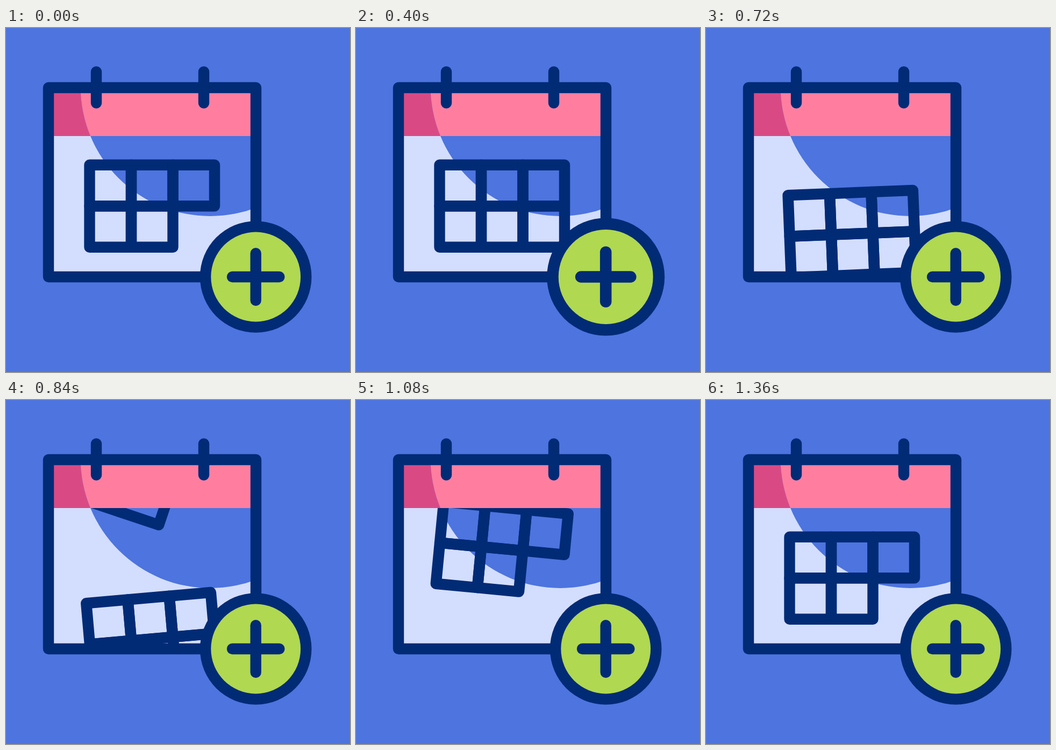
Write an HTML page with a canvas that moves like this. It is 640 by 640 pixels and loops after 1.48 s.

```html
<!DOCTYPE html>
<html lang="en">
<head>
<meta charset="utf-8">
<title>Add calendar day</title>
<style>
html, body { margin: 0; width: 100%; height: 100%; overflow: hidden; background: #4d74df; }
canvas { display: block; width: 640px; height: 640px; }
</style>
</head>
<body>
<canvas id="stage" width="640" height="640"></canvas>
<script>
const ctx = document.getElementById('stage').getContext('2d');
const LOOP = 1480, STEP = 40, LAST = 1360;
const BLUE = '#4d74df', NAVY = '#022b76', PALE = '#d3ddfd';
const PINK = '#ff7ea0', ROSE = '#d94a85', GREEN = '#b0d850';
const CELL_W = 77.5, CELL_H = 76.5, TRAVEL = 248;

// Eased progress from 0 to 1 between two times
function ease(t, start, end) {
  const u = Math.min(1, Math.max(0, (t - start) / (end - start)));
  return u * u * (3 - 2 * u);
}

function rect(color, x, y, w, h) {
  ctx.fillStyle = color;
  ctx.fillRect(x, y, w, h);
}

function disc(color, x, y, r) {
  ctx.fillStyle = color;
  ctx.beginPath();
  ctx.arc(x, y, r, 0, Math.PI * 2);
  ctx.fill();
}

function line(x1, y1, x2, y2) {
  ctx.beginPath();
  ctx.moveTo(x1, y1);
  ctx.lineTo(x2, y2);
  ctx.stroke();
}

function clipTo(x, y, w, h) {
  ctx.beginPath();
  ctx.rect(x, y, w, h);
  ctx.clip();
}

function drawPage() {
  rect(PALE, 79, 201, 386, 262);
  rect(ROSE, 79, 111, 386, 90);
  ctx.save();
  clipTo(79, 111, 386, 352);
  disc(BLUE, 380, 108.7, 241.3);
  clipTo(79, 111, 386, 90);
  disc(PINK, 380, 108.7, 241.3);
  ctx.restore();
}

// Five fixed cells plus a last one that grows from its corner
function drawGrid(dy, degrees, lastCell) {
  ctx.save();
  ctx.translate(271.75, 331.25 + dy);
  ctx.rotate(degrees * Math.PI / 180);
  for (let i = 0; i < 6; i++) {
    const size = i < 5 ? 1 : lastCell;
    if (size <= 0) continue;
    const x = (i % 3 - 1.5) * CELL_W;
    const y = (Math.floor(i / 3) - 1) * CELL_H;
    ctx.strokeRect(x, y, CELL_W * size, CELL_H * size);
  }
  ctx.restore();
}

function drawGrids(t) {
  const leave = ease(t, 520, 1200);
  const enter = ease(t, 620, 1280);
  ctx.save();
  clipTo(79, 201, 386, 262);
  if (leave < 1) drawGrid(TRAVEL * leave, -11 * leave, ease(t, 160, 380));
  if (enter > 0) drawGrid(-TRAVEL * (1 - enter), 25 * (1 - enter), 0);
  ctx.restore();
}

function drawFrame() {
  ctx.strokeRect(79, 111, 386, 352);
  for (const x of [168, 368]) line(x, 81.5, x, 139.5);
}

function drawButton(t) {
  const scale = 1 - 0.1 * ease(t, 0, 200) + 0.165 * ease(t, 200, 360) - 0.065 * ease(t, 360, 520);
  ctx.save();
  ctx.translate(464.7, 463);
  ctx.scale(scale, scale);
  disc(NAVY, 0, 0, 103.8);
  disc(GREEN, 0, 0, 83.4);
  line(-43.7, 0, 43.7, 0);
  line(0, -43.7, 0, 43.7);
  ctx.restore();
}

function draw(t) {
  rect(BLUE, 0, 0, 640, 640);
  ctx.strokeStyle = NAVY;
  ctx.lineWidth = 20.4;
  ctx.lineCap = ctx.lineJoin = 'round';
  drawPage();
  drawGrids(t);
  drawFrame();
  drawButton(t);
}

// Motion advances at 25 steps a second and rests at the end of the loop
function tick() {
  const t = performance.now() % LOOP;
  draw(Math.min(LAST, Math.floor(t / STEP) * STEP));
  requestAnimationFrame(tick);
}
tick();
</script>
</body>
</html>
```
